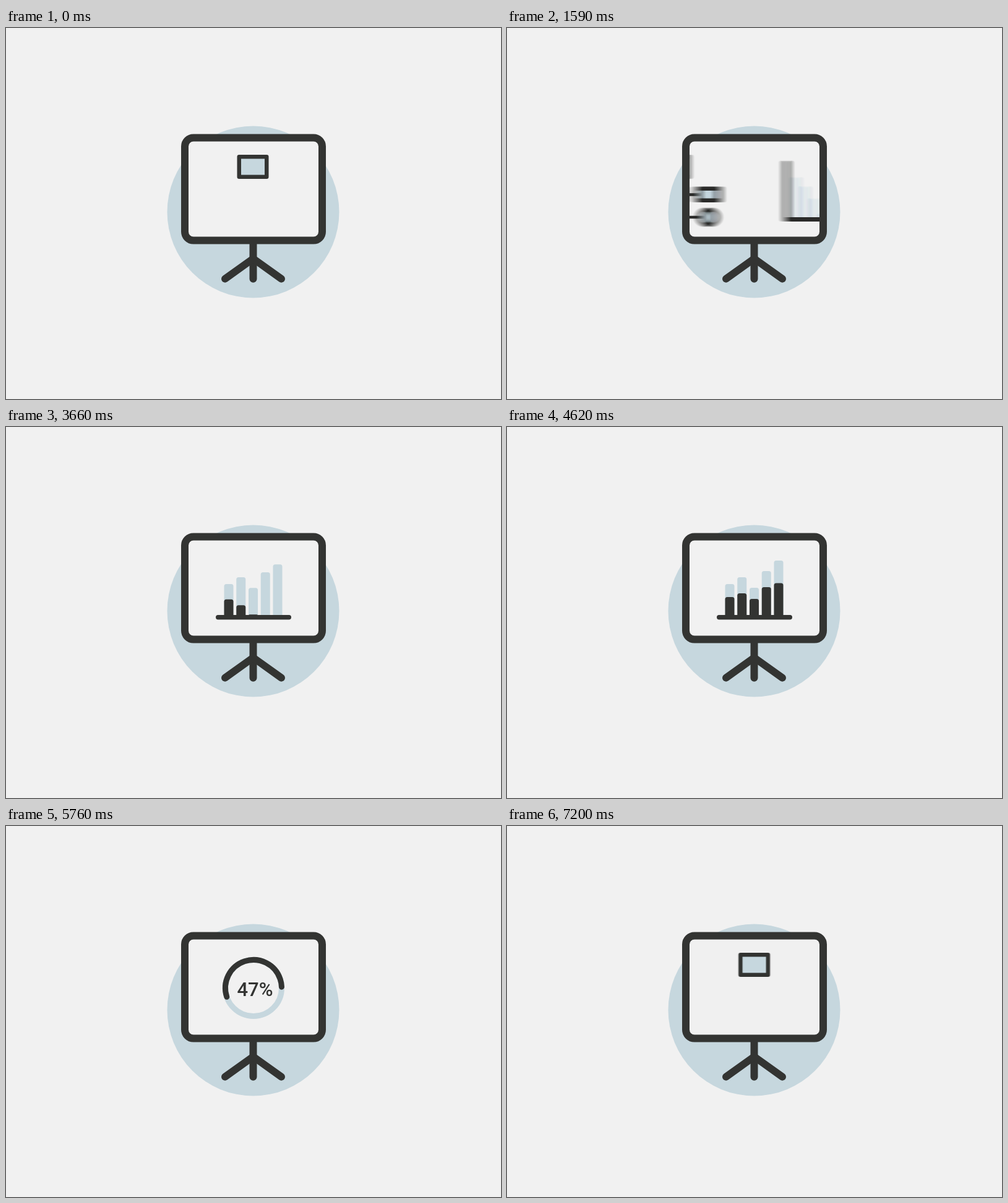
An HTML page with a canvas for the animation above (7230 ms loop, 800 px wide and 600 px high).

```html
<!DOCTYPE html>
<html lang="en">
<head>
<meta charset="utf-8">
<title>Presentation board</title>
<style>
  html, body { margin: 0; width: 100%; height: 100%; overflow: hidden; background: #f1f1f1; }
  canvas { display: block; }
</style>
</head>
<body>
<canvas id="stage" width="800" height="600"></canvas>
<script>
const LOOP = 7230, STEP = 30;
const PAPER = '#f1f1f1', INK = '#333432', BLUE = '#c6d7de';
const SLIDES = [1335, 3135, 4938, 6735];  // start of each push to the left
const SLIDE_TIME = 480, SLIDE_WIDTH = 240, SHUTTER = 27;

const stage = document.getElementById('stage').getContext('2d');
const strip = document.createElement('canvas');
strip.width = 800;
strip.height = 600;
const c = strip.getContext('2d');

const span = (t, start, time) => Math.min(1, Math.max(0, (t - start) / time));
const easeOut = u => 1 - (1 - u) ** 3;
const easeSine = u => (1 - Math.cos(Math.PI * u)) / 2;

function stroke(g, points, width, color = INK, cap = 'round') {
  g.beginPath();
  points.forEach(([x, y]) => g.lineTo(x, y));
  g.lineWidth = width;
  g.strokeStyle = color;
  g.lineCap = cap;
  g.lineJoin = 'round';
  g.stroke();
}

// Part of a straight connector, drawn up to progress u
function link(x1, y1, x2, y2, u) {
  if (u > 0) stroke(c, [[x1, y1], [x1 + (x2 - x1) * u, y1 + (y2 - y1) * u]], 4.6, INK, 'butt');
}

// Outlined shape that scales up around its centre
function pop(x, y, u, trace) {
  if (u <= 0) return;
  c.save();
  c.translate(x, y);
  c.scale(u, u);
  c.beginPath();
  trace();
  c.fillStyle = BLUE;
  c.fill();
  c.lineWidth = 6.5;
  c.strokeStyle = INK;
  c.lineJoin = 'round';
  c.stroke();
  c.restore();
}
const box = (x, y, w, h, u) => pop(x, y, u, () => c.rect(-w / 2, -h / 2, w, h));
const disc = (x, y, u) => pop(x, y, u, () => c.arc(0, 0, 12.25, 0, 7));

function orgChart(t) {
  if (t > SLIDES[2]) t -= LOOP;
  const grow = (start, time) => easeOut(span(t, start, time));
  link(399, 242, 399, 258, span(t, 0, 130));
  link(380, 269.5, 360, 269.5, span(t, 300, 130));
  link(418, 269.5, 438, 269.5, span(t, 300, 130));
  link(341, 281, 341, 294, span(t, 600, 110));
  link(354, 306, 387, 306, span(t, 885, 120));
  link(412, 306, 445, 306, span(t, 1070, 110));
  box(399, 224.5, 44.5, 32.5, 1);
  box(398.8, 269.2, 34, 19, grow(110, 240));
  box(340.8, 269.2, 34, 19, grow(400, 240));
  box(457, 269.2, 34, 19, grow(400, 240));
  disc(341, 306, grow(710, 210));
  disc(399, 306, grow(970, 180));
  disc(457, 306, grow(1150, 180));
}

// Pale columns rise one after another as their slide comes in
const rise = (t, slide, i) => easeOut(span(t, slide + 121 + i * 42, 400));

function lineChart(t) {
  for (let i = 0; i < 7; i++) {
    const u = rise(t, SLIDES[0], i), x = 359 + i * 15;
    if (u > 0) stroke(c, [[x, 309], [x, 309 - 91 * u]], 7, BLUE);
  }
  const trend = [[346, 285], [360, 271.5], [375, 286.5], [405, 256.5], [419.5, 269], [446, 244.5]];
  let left = 142 * span(t, 1770, 1070);
  const drawn = [trend[0]];
  for (let i = 1; i < trend.length && left > 0; i++) {
    const [ax, ay] = trend[i - 1], [bx, by] = trend[i];
    const length = Math.hypot(bx - ax, by - ay), k = Math.min(1, left / length);
    drawn.push([ax + (bx - ax) * k, ay + (by - ay) * k]);
    left -= length;
  }
  if (drawn.length > 1) stroke(c, drawn, 6.5);
  stroke(c, [[343.5, 218], [343.5, 309.5], [457.5, 309.5]], 7);
}

function bar(x, height, color) {
  if (height <= 0) return;
  c.beginPath();
  c.roundRect(x, 305 - height, 15, height, [Math.min(3.5, height), Math.min(3.5, height), 0, 0]);
  c.fillStyle = color;
  c.fill();
}

function barChart(t) {
  const pale = [51, 62, 45, 72, 89], dark = [30, 36, 27, 46, 65];
  pale.forEach((h, i) => {
    const x = 352.5 + i * 19.75;
    bar(x, h * rise(t, SLIDES[1], i), BLUE);
    bar(x, dark[i] * span(t, 3120 + i * 250, 620), INK);
  });
  stroke(c, [[342.7, 307.8], [457.3, 307.8]], 7.4);
}

function arc(from, to, color) {
  c.beginPath();
  c.arc(400, 262, 45.5, from, to);
  c.lineWidth = 9;
  c.lineCap = 'round';
  c.strokeStyle = color;
  c.stroke();
}

function ring(t) {
  arc(0, 2 * Math.PI, BLUE);
  const back = Math.PI * easeSine(span(t, 4940, 1450));
  const ahead = Math.PI * easeSine(span(t, 5120, 1300));
  if (back > 0) arc(-Math.PI / 2 - back, -Math.PI / 2 + ahead, INK);
  c.font = '500 condensed 31px Roboto, "Open Sans", sans-serif';
  c.textAlign = 'center';
  c.fillStyle = INK;
  c.fillText(Math.floor(100 * span(t, 4965, 1685)) + '%', 402.5, 275);
}

const charts = [orgChart, lineChart, barChart, ring];

function drawBoard(t) {
  let n = SLIDES.filter(s => t >= s + SLIDE_TIME).length;
  const u = n < 4 ? span(t, SLIDES[n], SLIDE_TIME) : 0;
  c.fillStyle = PAPER;
  c.fillRect(0, 0, 800, 600);
  charts[n % 4](t);
  if (u > 0) {
    c.save();
    c.translate(SLIDE_WIDTH, 0);
    charts[(n + 1) % 4](t);
    c.restore();
  }

  // Motion blur: running average of the strip along its path
  const speed = SLIDE_WIDTH / SLIDE_TIME * Math.PI / 2 * Math.sin(Math.PI * u);
  const blur = speed * SHUTTER, shift = -SLIDE_WIDTH * easeSine(u);
  const samples = Math.max(1, Math.ceil(blur));
  stage.save();
  stage.beginPath();
  stage.roundRect(289, 177.5, 222, 166, 14);
  stage.clip();
  for (let i = 0; i < samples; i++) {
    stage.globalAlpha = 1 / (i + 1);
    stage.drawImage(strip, shift + blur * ((i + 0.5) / samples - 0.5), 0);
  }
  stage.restore();
}

function draw(t) {
  stage.fillStyle = PAPER;
  stage.fillRect(0, 0, 800, 600);
  stage.beginPath();
  stage.arc(399.5, 297.5, 139, 0, 7);
  stage.fillStyle = BLUE;
  stage.fill();
  stroke(stage, [[399.5, 345], [399.5, 405.7]], 12);
  stroke(stage, [[354, 405.7], [399.5, 373], [445, 405.7]], 12);
  drawBoard(t);
  stage.beginPath();
  stage.roundRect(289, 177.5, 222, 166, 14);
  stage.lineWidth = 12;
  stage.strokeStyle = INK;
  stage.stroke();
}

const began = performance.now();
function tick() {
  const t = (performance.now() - began) % LOOP;
  draw(Math.floor(t / STEP) * STEP);
  requestAnimationFrame(tick);
}
tick();
</script>
</body>
</html>
```
